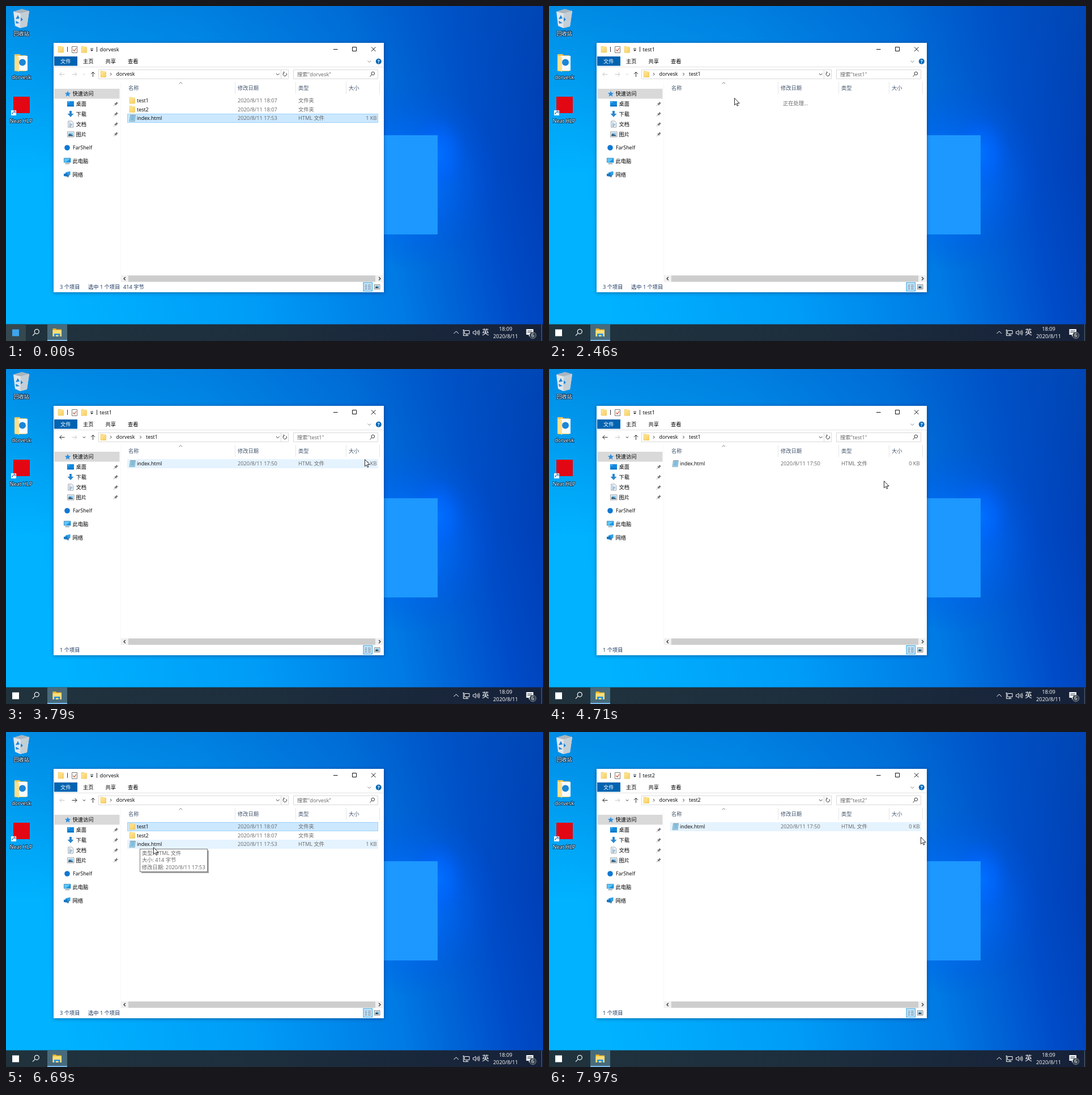
These frames come from a looping animation (948 px wide and 591 px high, 8 s). An HTML page:

```html
<!DOCTYPE html>
<html lang="zh-CN">
<head>
<meta charset="utf-8">
<title>Folder browsing</title>
<style>
html, body { margin: 0; width: 100%; height: 100%; overflow: hidden; background: #0078e0; }
svg { display: block; width: 948px; height: 591px; }
text { font: 9.25px "Open Sans", "Noto Sans CJK SC", "Noto Sans CJK JP", sans-serif; fill: #000; white-space: pre; }
.name { font-size: 8.95px; }
.dim text, text.dim { fill: #666; }
.head text { fill: #44566e; }
.status text { fill: #12305a; }
.label text { fill: #fff; text-anchor: middle; paint-order: stroke; stroke: #001428; stroke-opacity: .75; stroke-width: 1.8px; stroke-linejoin: round; }
.tray text { fill: #fff; }
.end { text-anchor: end; }
.mid { text-anchor: middle; }
.line { fill: none; stroke: #333; stroke-width: 1; }
.off { stroke: #c8c8c8; }
.white { stroke: #fff; }
.sel { fill: #cce8ff; stroke: #99d1ff; }
.hot { fill: #e5f3ff; }

/* Visibility tracks, 1% = 80 ms */
.on { animation: 8s step-end infinite; }
@keyframes root { 0% { opacity: 1 } 30.75% { opacity: 0 } 76.5% { opacity: 1 } 92.875% { opacity: 0 } }
@keyframes sub { 0% { opacity: 0 } 30.75% { opacity: 1 } 76.5% { opacity: 0 } 92.875% { opacity: 1 } }
@keyframes first { 0% { opacity: 0 } 30.75% { opacity: 1 } 76.5% { opacity: 0 } }
@keyframes second { 0% { opacity: 0 } 92.875% { opacity: 1 } }
@keyframes wait { 0% { opacity: 0 } 30.75% { opacity: 1 } 33.5% { opacity: 0 } 92.875% { opacity: 1 } 94.875% { opacity: 0 } }
@keyframes loaded { 0% { opacity: 0 } 33.5% { opacity: 1 } 76.5% { opacity: 0 } 94.875% { opacity: 1 } }
@keyframes three { 0% { opacity: 1 } 33.5% { opacity: 0 } 76.5% { opacity: 1 } 94.875% { opacity: 0 } }
@keyframes bytes { 0% { opacity: 1 } 28% { opacity: 0 } }
@keyframes forward { 0% { opacity: 0 } 76.5% { opacity: 1 } 94.875% { opacity: 0 } }
@keyframes history { 0% { opacity: 0 } 33.5% { opacity: 1 } }
@keyframes start { 0% { opacity: 1 } 2% { opacity: 0 } }
@keyframes sel1 { 0% { opacity: 0 } 24.875% { opacity: 1 } 90.125% { opacity: 0 } }
@keyframes sel2 { 0% { opacity: 0 } 90.125% { opacity: 1 } }
@keyframes sel3 { 0% { opacity: 1 } 24.875% { opacity: 0 } }
@keyframes hot1 { 0%, 16.2% { opacity: 0 } 19%, 24.86% { opacity: 1 } 24.875%, 100% { opacity: 0 } }
@keyframes hot2 { 0% { opacity: 0 } 87.5% { opacity: 1 } 90.125% { opacity: 0 } }
@keyframes hot3 { 0% { opacity: 0 } 81% { opacity: 1 } 87.5% { opacity: 0 } }
@keyframes hotFile { 0% { opacity: 0 } 33.5% { opacity: 1 } 36% { opacity: 0 } 45.5% { opacity: 1 } 56% { opacity: 0 } 94.875% { opacity: 1 } }
@keyframes tip { 0% { opacity: 0 } 82.5% { opacity: 1 } 87.5% { opacity: 0 } }
@keyframes crumb { 0% { opacity: 0 } 62.5% { opacity: 1 } 64.875% { opacity: 0 } }

#cursor { animation: move 8s linear infinite; }
@keyframes move {
  0%, 1.95% { transform: translate(0, 593px) }
  2% { transform: translate(4px, 575px) }
  3.5% { transform: translate(60px, 470px) }
  5% { transform: translate(200px, 300px) }
  6.25% { transform: translate(335px, 185px) }
  6.9% { transform: translate(357px, 163px) }
  8.75%, 11.4% { transform: translate(338px, 277px) }
  12.25% { transform: translate(335px, 225px) }
  13.5%, 16.25% { transform: translate(327px, 154px) }
  22.1%, 32% { transform: translate(327px, 162px) }
  37.5% { transform: translate(653px, 146px) }
  40.6% { transform: translate(573px, 136px) }
  41.4%, 44.1% { transform: translate(580px, 136px) }
  47.3%, 48.9% { transform: translate(633px, 159px) }
  50.9%, 54% { transform: translate(646px, 161px) }
  58.8%, 59.7% { transform: translate(591px, 197px) }
  63.75%, 64.8% { transform: translate(172px, 104px) }
  67% { transform: translate(130px, 89px) }
  70% { transform: translate(94px, 108px) }
  72.4%, 77.5% { transform: translate(100px, 119px) }
  81.5% { transform: translate(237px, 190px) }
  83.6%, 86.3% { transform: translate(260px, 203px) }
  88.25%, 94.8% { transform: translate(255px, 181px) }
  99.6%, 100% { transform: translate(656px, 185px) }
}
</style>
</head>
<body>
<svg viewBox="0 0 948 591">
<defs>
  <linearGradient id="sky" x2="1" y2="-.12">
    <stop offset="0" stop-color="#00b2ff"/><stop offset=".35" stop-color="#009cf6"/>
    <stop offset=".62" stop-color="#007ae4"/><stop offset=".82" stop-color="#004cc8"/>
    <stop offset="1" stop-color="#0036aa"/>
  </linearGradient>
  <linearGradient id="shade" x2="0" y2="1">
    <stop offset="0" stop-color="#0058c0" stop-opacity=".42"/><stop offset=".5" stop-color="#0058c0" stop-opacity="0"/>
  </linearGradient>
  <radialGradient id="glow">
    <stop offset="0" stop-color="#0a80ff" stop-opacity=".9"/><stop offset=".45" stop-color="#0068f8" stop-opacity=".6"/>
    <stop offset="1" stop-color="#0050e0" stop-opacity="0"/>
  </radialGradient>
  <radialGradient id="flare">
    <stop offset="0" stop-color="#0070ff"/><stop offset=".5" stop-color="#0066ff" stop-opacity=".6"/>
    <stop offset="1" stop-color="#0058f0" stop-opacity="0"/>
  </radialGradient>
  <linearGradient id="bar"><stop offset="0" stop-color="#20333d"/><stop offset=".5" stop-color="#1d2e3d"/><stop offset="1" stop-color="#162139"/></linearGradient>
  <linearGradient id="gold" x2="1" y2="1"><stop offset="0" stop-color="#ffe79a"/><stop offset="1" stop-color="#f7cf62"/></linearGradient>
  <g id="folder"><path d="M.3 .5H5L6 2H10.2V11.7H.3Z" fill="#e9b93f"/><path d="M.8 1H9.7V11.3H.8Z" fill="url(#gold)"/></g>
  <g id="page">
    <path d="M2 .8H11L9.7 11.6H.5Z" fill="#a9d8ee" stroke="#6b93a8" stroke-width=".7"/>
    <path d="M3.2 3H9.4M3 5H9.2M2.7 7H8.9M2.4 9H8.6" stroke="#4c9cc8" stroke-width=".9"/>
    <path d="M2.2 1H10.8" stroke="#777" stroke-width="1.1" stroke-dasharray="1 .8"/>
  </g>
  <g id="pin" fill="#777"><path d="M1 3.2 4.4 6.6 5 4.7 7 2.9 7.6 3 7.7 2.6 5.1 0 4.7.2 4.8.8 3 2.7Z"/><path d="M0 7.5 2.8 4.7" stroke="#777" stroke-width=".8"/></g>
  <g id="screen"><path d="M.4 .4H12V8H.4Z" fill="#1b9be8" stroke="#3c7fa8" stroke-width=".7"/><path d="M1 1H11.5L4 7.5H1Z" fill="#5cc5fa"/></g>
</defs>

<!-- Desktop -->
<rect width="948" height="591" fill="url(#sky)"/>
<rect width="948" height="591" fill="url(#shade)"/>
<ellipse cx="715" cy="300" rx="155" ry="165" fill="url(#glow)"/>
<ellipse cx="762" cy="260" rx="52" ry="70" fill="url(#flare)"/>
<rect x="587" y="228" width="175" height="175" fill="#1c98ff"/>

<path d="M13 10 28 5.5 41 9 37 36 25 39 16 35Z" fill="#dfe6ea"/>
<path d="M13 10 28 5.5 41 9 26 13Z" fill="#aab5bd"/>
<path d="M26 13 41 9 37 36 25 39Z" fill="#c4ced5"/>
<path d="M17 23 21 16 24 22ZM26 20 30 24 26 27ZM17 26 24 30 18 31Z" fill="#1f86dc"/>

<path d="M15 85H24L26 87H36V115H15Z" fill="#f2c65a"/>
<path d="M20 88H38V114H20Z" fill="#f7fbff"/>
<path d="M15 87 23 90V116L15 113Z" fill="#ffe08a"/>
<circle cx="29" cy="99.5" r="6" fill="#1b86d8"/>

<rect x="13" y="160" width="29" height="29" fill="#e30613"/>
<rect x="9" y="184" width="9" height="9" fill="#fff"/>
<path d="M11 191Q11 187.5 14.5 187.5M13 185.5H16V189" fill="none" stroke="#1460b8" stroke-width="1.2"/>
<g class="label">
  <text x="27" y="51.5">回收站</text>
  <text x="27" y="128.5">dorvesk</text>
  <text x="26.5" y="205.5">Neat HLP</text>
</g>

<!-- Window frame -->
<rect x="84" y="65" width="583" height="440" fill="#fff" style="filter:drop-shadow(0 1px 3px #0026)"/>
<use href="#folder" x="91.5" y="70.5"/>
<path d="M108.5 72V81M160.5 72V81" class="line" stroke-width=".8"/>
<path d="M116.5 71.5H125.5V82.5H116.5Z" fill="#fff" stroke="#7a7a7a"/>
<path d="M118.5 77 120.5 79.5 124 74.5" fill="none" stroke="#d2562a" stroke-width="1.3"/>
<use href="#folder" x="132.5" y="70.8"/>
<path d="M149 75H154" class="line"/><path d="M148.8 77H154.2L151.5 80Z" fill="#333"/>
<g class="name">
  <text class="on" x="165.5" y="80.3" style="animation-name:root">dorvesk</text>
  <text class="on" x="165.5" y="80.3" style="animation-name:first">test1</text>
  <text class="on" x="165.5" y="80.3" style="animation-name:second">test2</text>
</g>
<path d="M578 76.5H585.5M611.5 72.5H618.5V79.5H611.5ZM645 72.5 652.5 80M652.5 72.5 645 80" class="line" style="stroke:#111"/>
<rect x="85" y="89" width="41" height="16.5" fill="#0063b1"/>
<text x="96" y="101" style="fill:#fff">文件</text>
<text x="136" y="101">主页</text><text x="175.5" y="101">共享</text><text x="215" y="101">查看</text>
<path d="M638.5 96.5 641.5 99.5 644.5 96.5" class="line" style="stroke:#888"/>
<circle cx="657.8" cy="97.8" r="5" fill="#0068b8"/>
<text class="mid" x="657.8" y="101" style="fill:#fff;font-size:8.5px;font-weight:700">?</text>
<path d="M85 107.5H666" stroke="#e2e3e4"/>

<!-- Address bar -->
<path d="M103.5 120.5H94.8M98.3 117 94.8 120.5 98.3 124" class="line off"/>
<path d="M116.5 120.5H125M121.5 117 125 120.5 121.5 124" class="line off"/>
<path d="M136 119.5 138 121.5 140 119.5" class="line off"/>
<path d="M103.5 120.5H94.8M98.3 117 94.8 120.5 98.3 124" class="line on" style="animation-name:loaded"/>
<path d="M116.5 120.5H125M121.5 117 125 120.5 121.5 124" class="line on" style="animation-name:forward"/>
<path d="M136 119.5 138 121.5 140 119.5" class="line on" style="animation-name:history"/>
<path d="M153.5 125V116.5M150 120 153.5 116.5 157 120" class="line"/>
<path d="M163.5 112.5H498.5V128.5H163.5ZM485.5 112.5V128.5M507.5 112.5H656.5V128.5H507.5Z" fill="none" stroke="#d9d9d9"/>
<rect class="hot on" x="190.5" y="113" width="53" height="15" stroke="#cce8ff" style="animation-name:crumb"/>
<use href="#folder" x="166.5" y="114.3"/>
<path d="M184 118 186.2 120.3 184 122.6" class="line"/>
<text class="name" x="194.5" y="123.3">dorvesk</text>
<path d="M477 119 479.8 121.8 482.6 119" class="line"/>
<path d="M494.8 118.4A3.2 3.2 0 1 1 491 117.4M490 115.4 491.3 117.5 489.3 118.7" class="line"/>
<path d="M236.5 118 238.7 120.3 236.5 122.6" class="line on" style="animation-name:sub"/>
<g class="dim">
  <text class="on" x="514" y="124" style="animation-name:root">搜索"dorvesk"</text>
  <text class="on" x="514" y="124" style="animation-name:first">搜索"test1"</text>
  <text class="on" x="514" y="124" style="animation-name:second">搜索"test2"</text>
</g>
<text class="name on" x="247" y="123.3" style="animation-name:first">test1</text>
<text class="name on" x="247" y="123.3" style="animation-name:second">test2</text>
<circle cx="647.8" cy="119" r="2.8" class="line"/><path d="M645.6 121.2 642.5 124.5" class="line"/>

<!-- Sidebar -->
<rect x="85" y="146" width="115.5" height="17.5" fill="#d9d9d9"/>
<path d="M202.5 134V487" stroke="#f8f8f8"/>
<path d="M109 149.8 110.5 153.2 114.2 153.5 111.4 156 112.3 159.7 109 157.7 105.7 159.7 106.6 156 103.8 153.5 107.5 153.2Z" fill="#2f8fdc"/>
<path d="M108 168H120V177.5H108Z" fill="#1089e0"/><path d="M108 175.6H120" stroke="#0a5ea8"/><path d="M109.5 170H112" stroke="#bfe6ff"/>
<path d="M112 185H116V190H119.5L114 196 108.5 190H112Z" fill="#2b88d0"/>
<path d="M109.8 203H116L118.6 205.6V214H109.8Z" fill="#fff" stroke="#808890" stroke-width=".8"/>
<path d="M111.5 206H114M111.5 208.3H117M111.5 210.3H117M111.5 212.2H115" stroke="#3f82b8" stroke-width=".9"/>
<path d="M108.5 221.8H120V231H108.5Z" fill="#fff" stroke="#888" stroke-width=".8"/>
<path d="M110 223.5H118.5V229.5H110Z" fill="#8cc8ec"/><path d="M110 229.5V227L113 225.5 118.5 228.5V229.5Z" fill="#365f78"/>
<circle cx="108" cy="250" r="4.8" fill="#0f78d4"/>
<use href="#screen" x="102" y="268"/><path d="M104.5 278.3H112" stroke="#6d8794" stroke-width="1.2"/>
<path d="M105 293.5 113.5 291.5V298L105 300.5Z" fill="#2f9fe6"/>
<path d="M102 296 108.5 295V301L102 300Z" fill="#1477c4"/><path d="M107.5 299.5 112 297.5 109.5 303Z" fill="#3c6c98"/>
<use href="#pin" x="190" y="169"/><use href="#pin" x="190" y="187"/><use href="#pin" x="190" y="205"/><use href="#pin" x="190" y="222.3"/>
<text x="117.5" y="158.3">快速访问</text>
<text x="123.5" y="176.2">桌面</text><text x="123.5" y="194">下载</text>
<text x="123.5" y="211.8">文档</text><text x="123.5" y="229.5">图片</text>
<text class="name" x="118" y="253.2">FarShelf</text>
<text x="117.5" y="276.8">此电脑</text><text x="117.5" y="300.5">网络</text>

<!-- File list -->
<g class="head">
  <text x="216" y="148">名称</text><text x="409" y="148">修改日期</text>
  <text x="516" y="148">类型</text><text x="605" y="148">大小</text>
</g>
<path d="M305.5 137.3 308.3 134.6 311.1 137.3" class="line" style="stroke:#777"/>
<path d="M404.5 134V155M511.5 134V155M600.5 134V155M659.5 134V155" stroke="#e5e5e5"/>

<g class="on" style="animation-name:root">
  <rect class="hot" x="214" y="159" width="443" height="16" style="animation:hot1 8s linear infinite"/>
  <rect class="hot on" x="214" y="174.5" width="443" height="16" style="animation-name:hot2"/>
  <rect class="hot on" x="214" y="190" width="443" height="16" style="animation-name:hot3"/>
  <rect class="sel on" x="214.5" y="159.5" width="442" height="15" style="animation-name:sel1"/>
  <rect class="sel on" x="214.5" y="175" width="442" height="15" style="animation-name:sel2"/>
  <rect class="sel on" x="214.5" y="190.5" width="442" height="15" style="animation-name:sel3"/>
  <use href="#folder" x="217.5" y="160.5"/><use href="#folder" x="217.5" y="176"/><use href="#page" x="217.5" y="191.8"/>
  <text class="name" x="231" y="170">test1</text>
  <text class="name" x="231" y="185.5">test2</text>
  <text class="name" x="231" y="201">index.html</text>
  <g class="dim">
    <text x="409" y="170">2020/8/11 18:07</text><text x="516" y="170">文件夹</text>
    <text x="409" y="185.5">2020/8/11 18:07</text><text x="516" y="185.5">文件夹</text>
    <text x="409" y="201">2020/8/11 17:53</text><text x="516" y="201">HTML 文件</text>
    <text class="end" x="654.5" y="201">1 KB</text>
  </g>
</g>
<text class="dim on" x="413" y="175" style="animation-name:wait">正在处理...</text>
<g class="on" style="animation-name:loaded">
  <rect class="hot on" x="214" y="159" width="443" height="16" style="animation-name:hotFile"/>
  <use href="#page" x="217.5" y="160.8"/>
  <text class="name" x="231" y="170">index.html</text>
  <g class="dim">
    <text x="409" y="170">2020/8/11 17:50</text><text x="516" y="170">HTML 文件</text>
    <text class="end" x="654.5" y="170">0 KB</text>
  </g>
</g>

<rect x="203" y="475" width="463" height="12" fill="#f0f0f0"/>
<rect x="216" y="475.5" width="436" height="11" fill="#cdcdcd"/>
<path d="M210.8 478.2 208 481 210.8 483.8M658.2 478.2 661 481 658.2 483.8" class="line" style="stroke-width:1.3"/>

<g class="status">
  <g class="on" style="animation-name:three">
    <text x="95" y="499.2">3 个项目</text><text x="145" y="499.2">选中 1 个项目</text>
  </g>
  <text class="on" x="207" y="499.2" style="animation-name:bytes">414 字节</text>
  <text class="on" x="95" y="499.2" style="animation-name:loaded">1 个项目</text>
</g>
<rect x="631" y="488" width="15.5" height="15" fill="#cce8ff" stroke="#26a0da"/>
<path d="M633.5 492H637.5M633.5 494.5H637.5M633.5 497H637.5M633.5 499.5H637.5M639 492H644M639 494.5H644M639 497H644M639 499.5H644" stroke="#5d7480" stroke-width=".9"/>
<path d="M650.5 491.5H660V499.5H650.5Z" fill="#fff" stroke="#777" stroke-width=".9"/><path d="M652 493H658.5V498H652Z" fill="#7fb8d8"/><path d="M652 498V496L655 495 658.5 498Z" fill="#2f4c5c"/>

<g class="on" style="animation-name:tip">
  <rect x="239" y="209" width="119" height="40" fill="#000" opacity=".35"/>
  <rect x="236.5" y="206.5" width="119" height="40" fill="#fff" stroke="#777"/>
  <g class="dim">
    <text x="240" y="216.7">类型: HTML 文件</text>
    <text x="240" y="229.2">大小: 414 字节</text>
    <text x="240" y="242">修改日期: 2020/8/11 17:53</text>
  </g>
</g>

<!-- Taskbar -->
<rect y="561.5" width="948" height="30" fill="url(#bar)"/>
<rect x="11" y="570.5" width="12" height="12" fill="#fff"/>
<g class="on" style="animation-name:start">
  <rect y="561.5" width="35" height="30" fill="#35474f"/>
  <rect x="11" y="570.5" width="12" height="12" fill="#3da5ee"/>
</g>
<circle cx="54.3" cy="574.3" r="4" class="line white" style="stroke-width:1.2"/>
<path d="M51.4 577.2 47 581.6" class="line white" style="stroke-width:1.2"/>
<rect x="73" y="561.5" width="35" height="30" fill="#486b7c"/>
<rect x="73" y="589" width="35" height="2" fill="#76b9ed"/>
<path d="M82.5 569H88L89.5 570.5H98V582.5H82.5Z" fill="#f0b429"/>
<path d="M82.5 572H98V583H82.5Z" fill="#ffdf78"/>
<path d="M85 583V578H95.5V583H92.5V580.5H88V583Z" fill="#2a8fdb"/>
<g class="tray">
  <path d="M790.5 578 794.7 573.8 798.9 578" class="line white"/>
  <path d="M809.5 572.5H818V578.5H809.5ZM813.7 578.5V581M810.8 581.5H816.5M806.5 571.5H809M807.5 571.5V581.5H811" class="line white"/>
  <path d="M824.5 574.5H826.5L829 572V580.5L826.5 578H824.5ZM831 574Q832.5 576.2 831 578.5M833 572.7Q835 576.2 833 579.8M834.8 571.5Q837.5 576.2 834.8 581" class="line white" style="stroke-width:.9"/>
  <text x="840.3" y="580.3" style="font-size:12.5px">英</text>
  <text class="mid" x="882" y="572.5">18:09</text>
  <text class="mid" x="882" y="586.3">2020/8/11</text>
  <path d="M918.5 570H931V580H926L923 583V580H918.5Z" fill="#fff"/>
  <path d="M920.5 573H929M920.5 575.5H929" stroke="#1c2a3c" stroke-width=".9"/>
  <circle cx="930" cy="581" r="5.8" fill="#36424f" stroke="#8b949c" stroke-width=".8"/>
  <text class="mid" x="930" y="584.3">6</text>
  <path d="M945.5 562V591" stroke="#56657a"/>
</g>

<g id="cursor"><path d="M.5 .6V12.8L3.3 10.2 5.2 14.3 7 13.5 5.2 9.5H9.1Z" fill="#fff" stroke="#111" stroke-width=".9"/></g>
</svg>
</body>
</html>
```
